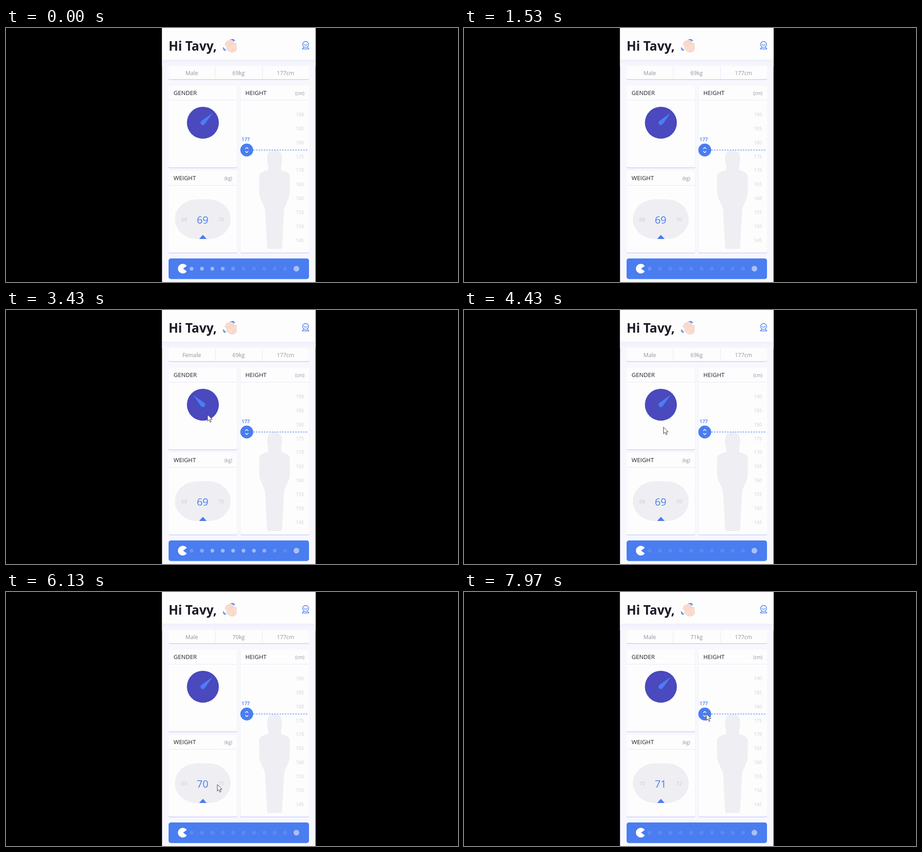
An HTML page that plays this animation: 998 by 561 pixels, repeating every 8 s.

```html
<!DOCTYPE html>
<html lang="en">
<head>
<meta charset="utf-8">
<title>Body profile</title>
<style>
  html, body { margin: 0; width: 100%; height: 100%; overflow: hidden; background: #000; }
  svg { display: block; width: 100vw; height: 100vh; font-family: "Open Sans", "Noto Sans", sans-serif; }
  .card { fill: #fdfdfd; }
  .edge { fill: #c9cdfa; }
  .rule { stroke: #e4e5fa; fill: none; }
  .heading { font-size: 13px; font-weight: 500; fill: #20202c; }
  .unit { font-size: 10px; fill: #8b8b9b; }
  .summary { font-size: 12.2px; fill: #94949f; text-anchor: middle; }
  .tick { font-size: 10.4px; fill: #d0d0d8; text-anchor: middle; }
  .side { font-size: 11.5px; fill: #cbcbd6; text-anchor: middle; }
  .blue { fill: #4a7df0; }
  .soft { fill: #eeeef3; }
  .line { fill: none; stroke: #4a7df0; stroke-linecap: round; stroke-linejoin: round; }
</style>
</head>
<body>
<svg viewBox="0 0 998 561">
  <defs>
    <linearGradient id="shade" x2="0" y2="1">
      <stop stop-color="#f0f0fc"/><stop offset="1" stop-color="#f7f7fd"/>
    </linearGradient>
  </defs>
  <rect width="998" height="561"/>
  <rect x="344.5" width="339" height="561" fill="#f7f7fd"/>
  <rect x="344.5" y="70" width="339" height="15" fill="url(#shade)"/>
  <rect x="344.5" width="339" height="70" class="card"/>
  <text x="359" y="50" font-size="27.8" font-weight="700" fill="#1b1b26">Hi Tavy,</text>

  <g id="hand" stroke-linecap="round" stroke-linejoin="round">
    <g fill="none" stroke="#f2c5b2" stroke-width="6.2">
      <path id="fingers" d="M497 44L486.5 36M498 42L489 31.500M501 40L494 29.500M503 41L499.500 31"/>
      <path d="M505 45L506 36"/>
    </g>
    <path d="M488 41L499 33L506 37L509 45Q508 53 499 53.500Q493 53 488 47Z" fill="#fbdccf" stroke="#f2c5b2"/>
    <path d="M497 44L486.500 36M498 42L489 31.500M501 40L494 29.500M503 41L499.500 31M505 45L506 36" fill="none" stroke="#fbdccf" stroke-width="4.6"/>
    <path d="M490 37L495 41M493 33L498 38M498 32L501 37M503 44Q500 45 500 49" fill="none" stroke="#efbda9" stroke-width=".8"/>
    <path class="line" stroke-width="1.500" d="M496 25.500Q501 25.500 503 29M500 24.800Q503 25.300 505 28M480 43Q481 47 485 48M479.500 46Q481 49 484 50"/>
  </g>

  <g class="line" stroke-width="1.400">
    <circle cx="661.500" cy="36.300" r="6.600"/>
    <path d="M657.500 36.500Q661.500 39.500 665.500 36.500M657.500 41.800L654.200 46.300H668.800L665.500 41.800"/>
  </g>

  <g id="cards"></g>
  <path class="rule" d="M462 85V112M566 85V112"/>
  <text id="sex" class="summary" x="410" y="103.500"></text>
  <text id="mass" class="summary" x="513.500" y="103.500"></text>
  <text class="summary" x="617" y="103.500">177cm</text>

  <text class="heading" x="370" y="148.400">GENDER</text>
  <text class="heading" x="370" y="336.400">WEIGHT</text>
  <text class="heading" x="528.500" y="148.400">HEIGHT</text>
  <text class="unit" x="482.500" y="335.500">(kg)</text>
  <text class="unit" x="638.700" y="147.500">(cm)</text>

  <circle cx="434.700" cy="209.200" r="35.300" fill="#4a49bd"/>
  <path id="needle" fill="#4a7df5" d="M434.700 178.500L439.700 207.500A5.300 5.300 0 1 1 429.700 207.500Z"/>

  <rect class="soft" x="373" y="378.500" width="123" height="87.500" rx="49" ry="44"/>
  <text id="less" class="side" x="393.500" y="426.800"></text>
  <text id="weight" class="blue" x="434" y="432" font-size="22.500" text-anchor="middle"></text>
  <text id="more" class="side" x="475" y="426.800"></text>
  <path class="blue" d="M426.500 466L433 458.500Q434.700 456.500 436.400 458.500L443 466Z"/>

  <path class="soft" d="M593 270C604 270 609.500 277 609.500 287C609.500 296 608 301 607.500 306V313
    C613 317 626.500 317 626.500 328V362C626.500 377 616 390 614 401L609.500 484Q609 488 605 488H581
    Q577 488 576.700 484L572 401C570 390 559 377 559 362V328C559 317 573 317 579 313V306
    C578 301 576.500 296 576.500 287C576.500 277 582 270 593 270Z"/>
  <g id="ticks"></g>
  <path d="M546 269.500H667" stroke="#5f88eb" stroke-width="1.600" stroke-dasharray="3.200 2.600"/>
  <text class="blue" x="520" y="250" font-size="10.800" font-weight="600">177</text>
  <circle class="blue" cx="531.600" cy="269.500" r="14.200"/>
  <path d="M528.300 267L531.600 263.800L534.900 267M528.300 272L531.600 275.200L534.900 272" fill="none" stroke="#fff" stroke-width="1.600"/>

  <rect class="blue" x="359" y="509" width="310" height="45.500" rx="5"/>
  <path fill="#fff" d="M391 531.500L399.200 525.500A10.700 10.700 0 1 0 399.200 537.500Z"/>
  <g id="dots" fill="#dde4fa"></g>
  <circle cx="641.200" cy="531.500" r="6.300" fill="#a9bff5"/>

  <path id="cursor" d="M0 0V14.500L3.400 11.400L5.800 16.800L8.200 15.800L5.800 10.500H10.400Z" fill="#fff" stroke="#33333b" stroke-width="1"/>
</svg>
<script>
const LOOP = 8000;
const $ = id => document.getElementById(id);
const clamp = v => Math.max(0, Math.min(1, v));
const smooth = v => { v = clamp(v); return v * v * (3 - 2 * v); };

function add(parent, tag, attrs, text = "") {
  const node = document.createElementNS("http://www.w3.org/2000/svg", tag);
  for (const key in attrs) node.setAttribute(key, attrs[key]);
  node.textContent = text;
  return parent.appendChild(node);
}

// x, y, width, height, y of the heading rule
const cards = [
  [359, 84, 310, 29],
  [359, 127, 151.5, 181, 159.5],
  [359, 315, 151.5, 181, 347.5],
  [517.5, 127, 151.5, 369, 159.5]
];
for (const [x, y, width, height, rule] of cards) {
  add($("cards"), "rect", { class: "edge", x, y: y + 1.5, width, height, rx: 3 });
  add($("cards"), "rect", { class: "card", x, y, width, height, rx: 3 });
  if (rule) add($("cards"), "path", { class: "rule", d: `M${x} ${rule}h${width}` });
}

for (let i = 0; i < 10; i++)
  add($("ticks"), "text", { class: "tick", x: 649, y: 194.8 + i * 30.9 }, 190 - i * 5);

const dots = Array.from({ length: 10 }, (_, i) =>
  add($("dots"), "circle", { cx: 409.7 + i * 22.95, cy: 531.7, r: 4.1 }));

const pulses = [0, 1690, 3280, 4920, 6560];
const female = [2900, 3950];
const weightSteps = [6050, 6450];
const path = [
  [1800, 392, 221], [2030, 395, 224], [2450, 424, 222], [2750, 440, 228],
  [3430, 445, 231], [3900, 442, 226], [4250, 441, 228], [4900, 438, 390],
  [5230, 435, 411], [5700, 466, 424], [6870, 468, 428], [7250, 470, 425],
  [7700, 530, 275], [7970, 535, 269]
];

function dotLight(i, t) {
  return Math.max(...pulses.map(start => {
    const on = start + (i - 3.6) * 38;
    const off = start + 310 + (i - 4.8) * 38;
    return smooth((t - on) / 110 + 0.5) * (1 - smooth((t - off) / 120 + 0.5));
  }));
}

function cursorAt(t) {
  const next = path.findIndex(p => p[0] > t);
  if (next < 0) return path[path.length - 1].slice(1);
  const [t0, x0, y0] = path[next - 1], [t1, x1, y1] = path[next];
  const k = smooth((t - t0) / (t1 - t0));
  return [x0 + (x1 - x0) * k, y0 + (y1 - y0) * k];
}

function draw(t) {
  dots.forEach((dot, i) => dot.setAttribute("opacity", 0.13 + 0.47 * dotLight(i, t)));

  const turn = smooth((t - female[0]) / 250) - smooth((t - female[1]) / 250);
  $("needle").setAttribute("transform", `rotate(${45 - 90 * turn} 434.7 209.2)`);
  $("sex").textContent = t >= female[0] && t < female[1] ? "Female" : "Male";

  const kg = 69 + weightSteps.filter(step => t >= step).length;
  $("mass").textContent = kg + "kg";
  $("less").textContent = kg - 1;
  $("weight").textContent = kg;
  $("more").textContent = kg + 1;

  const shown = t >= path[0][0];
  $("cursor").setAttribute("visibility", shown ? "visible" : "hidden");
  if (shown) $("cursor").setAttribute("transform", `translate(${cursorAt(t)})`);
}

const begin = performance.now();
function tick() {
  draw((performance.now() - begin) % LOOP);
  requestAnimationFrame(tick);
}
tick();
</script>
</body>
</html>
```
